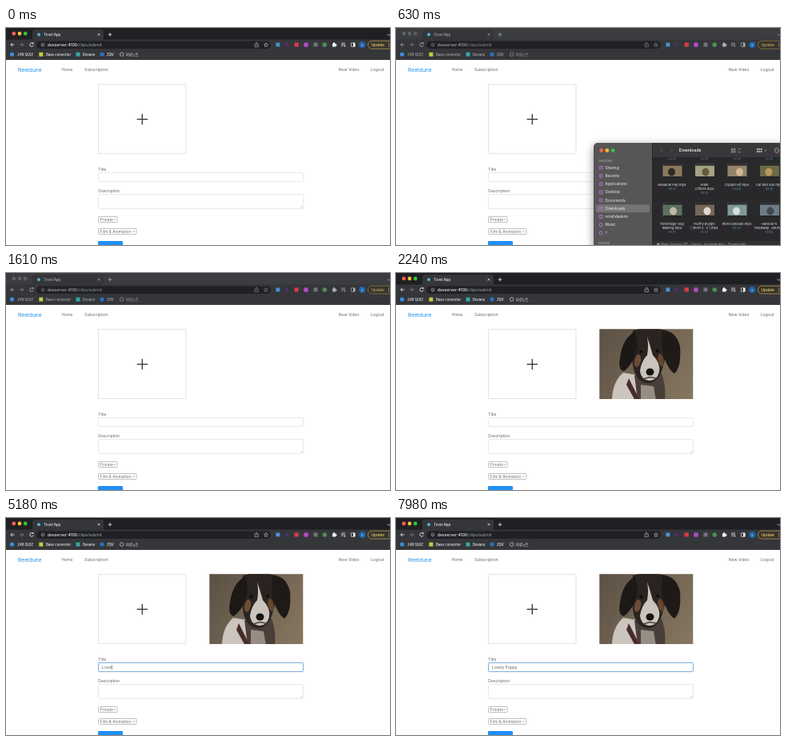
Recreate the animation shown at these times as an HTML page with a canvas. Size 480 by 272 pixels, loop 8000 ms.

```html
<!DOCTYPE html>
<html lang="en">
<head>
<meta charset="utf-8">
<title>Upload form</title>
<style>
html, body { margin: 0; width: 100%; height: 100%; overflow: hidden; background: #fff; }
canvas { display: block; width: 480px; height: 272px; }
</style>
</head>
<body>
<canvas id="stage"></canvas>
<script>
const W = 480, H = 272, LOOP = 8000;
const SANS = 'Inter, "Noto Sans CJK KR", "Noto Sans CJK", sans-serif';
const canvas = document.getElementById('stage');
const g = canvas.getContext('2d');
const ratio = window.devicePixelRatio || 1;
canvas.width = W * ratio;
canvas.height = H * ratio;

const DIALOG_IN = 420, PICK = 1400, DIALOG_OUT = 1610, ACTIVE = 1680, PREVIEW = 2240;
const FOCUS = 3500, CARET = 3340;
const TITLE = 'Lovely Puppy';
const KEYS = [4130, 4480, 4620, 4830, 4970, 5320, 5530, 5740, 6090, 6370, 6860, 7000];

const clamp = v => Math.max(0, Math.min(1, v));

function rect(x, y, w, h, fill) {
  g.fillStyle = fill;
  g.fillRect(x, y, w, h);
}

function box(x, y, w, h, r, fill, stroke, lw = 1) {
  g.beginPath();
  g.roundRect(x, y, w, h, r);
  if (fill) { g.fillStyle = fill; g.fill(); }
  if (stroke) { g.strokeStyle = stroke; g.lineWidth = lw; g.stroke(); }
}

function oval(x, y, rx, ry, fill, turn = 0) {
  g.beginPath();
  g.ellipse(x, y, rx, ry, turn, 0, 7);
  g.fillStyle = fill;
  g.fill();
}

const dot = (x, y, r, fill) => oval(x, y, r, r, fill);

function ring(x, y, r, color, lw = 0.7) {
  g.beginPath();
  g.arc(x, y, r, 0, 7);
  g.strokeStyle = color;
  g.lineWidth = lw;
  g.stroke();
}

function line(color, lw, ...p) {
  g.beginPath();
  for (let i = 0; i < p.length; i += 2) g.lineTo(p[i], p[i + 1]);
  g.strokeStyle = color;
  g.lineWidth = lw;
  g.stroke();
}

function shape(path, fill) {
  g.fillStyle = fill;
  g.fill(new Path2D(path));
}

function text(s, x, y, size, color, weight = 400, align = 'left') {
  g.font = `${weight} ${size}px ${SANS}`;
  g.textAlign = align;
  g.fillStyle = color;
  g.fillText(s, x, y);
  return g.measureText(s).width;
}

function lights(x, y, on) {
  ['#ff5f57', '#febc2e', '#28c840'].forEach((c, i) => dot(x + i * 7.2, y, 2.4, on ? c : '#5d6064'));
}

function browser(on) {
  const ink = on ? '#eef0f2' : '#a9acb0', soft = on ? '#c3c6ca' : '#8d9196';
  rect(0, 0, W, 15, on ? '#1f2023' : '#3b3d41');
  rect(0, 14.5, W, 25.5, '#35363a');
  box(33, 2, 89, 16, 3, '#35363a');
  lights(9.8, 7, on);
  dot(41, 8.2, 2, '#4fb5d0');
  text('Tovel App', 47.3, 10, 4.4, ink, 500);
  line(ink, 0.7, 114.6, 6.8, 117.4, 9.6);
  line(ink, 0.7, 117.4, 6.8, 114.6, 9.6);
  line(ink, 0.8, 127.7, 8.2, 132.3, 8.2);
  line(ink, 0.8, 130, 5.9, 130, 10.5);
  line(ink, 0.7, 476.5, 7.5, 478.5, 9.3, 480.5, 7.5);

  // toolbar
  line(ink, 0.8, 8, 18.8, 5.8, 21, 8, 23.2);
  line(ink, 0.8, 5.8, 21, 10.5, 21);
  line('#85888c', 0.8, 19.5, 18.8, 21.7, 21, 19.5, 23.2);
  line('#85888c', 0.8, 17, 21, 21.7, 21);
  g.beginPath();
  g.arc(32, 21, 2.2, 0.3, 5.6);
  g.strokeStyle = ink;
  g.lineWidth = 0.8;
  g.stroke();
  shape('M32.2 18.3h2.3v2.4z', ink);
  box(38, 16.4, 293, 9.6, 4.8, '#202124');
  ring(46, 21, 1.9, soft, 0.6);
  line(soft, 0.6, 46, 20.6, 46, 22.2);
  const host = text('devserver:4100', 51.8, 22.9, 5, ink, 500);
  text('/clips/submit', 51.8 + host, 22.9, 5, on ? '#a4a9af' : '#8d9196');
  line(soft, 0.6, 312.2, 20, 311, 20, 311, 23.6, 315.4, 23.6, 315.4, 20, 314.2, 20);
  line(soft, 0.6, 313.2, 22, 313.2, 18.2);
  line(soft, 0.6, 312, 19.2, 313.2, 18, 314.4, 19.2);
  g.beginPath();
  for (let i = 0; i <= 10; i++) {
    const a = i * Math.PI / 5 - Math.PI / 2, r = i % 2 ? 1.2 : 2.8;
    g.lineTo(325 + r * Math.cos(a), 21.2 + r * Math.sin(a));
  }
  g.strokeStyle = soft;
  g.lineWidth = 0.6;
  g.stroke();

  rect(337.5, 18.5, 4.8, 4.8, '#4b93d6');
  rect(349, 18.8, 3.6, 4.6, '#4d2f68');
  box(360.5, 18.2, 5.4, 5.4, 1, '#d83b42');
  dot(375, 21, 2.9, '#b34ac8');
  rect(384.5, 18.4, 5, 5, '#70757a');
  dot(398.3, 21, 2.8, '#4f9150');
  box(408, 19.3, 4.3, 4.3, 0.5, ink);
  dot(410, 19, 1.1, ink);
  dot(412.5, 21.4, 1.1, ink);
  for (let i = 0; i < 3; i++) line(ink, 0.7, 419, 19 + i * 1.7, i < 2 ? 424 : 421.5, 19 + i * 1.7);
  dot(423.5, 22.6, 0.9, ink);
  box(431.4, 18.8, 4.8, 4.5, 0.4, null, ink, 0.7);
  rect(434, 18.8, 2.2, 4.5, ink);
  dot(445.3, 21, 4, '#1d67ad');
  text('S', 445.3, 22.5, 4, '#dce7f2', 400, 'center');
  box(452.5, 16.2, 34, 9.8, 4.9, '#35332f', on ? '#d0a548' : '#a1853f', 0.7);
  text('Update', 456.5, 22.7, 4.8, on ? '#f8d067' : '#c8aa5c', 500);
  for (let i = -1; i < 2; i++) dot(478.5, 21 + i * 1.9, 0.55, '#d9bb68');

  // bookmarks
  dot(7.6, 33, 2.6, '#3a8ee0');
  rect(41.3, 30.6, 5, 5, '#c6cc3f');
  rect(87.5, 30.6, 5, 5, '#35a9a4');
  dot(120, 33, 2.6, '#2871c4');
  ring(144.7, 33, 2.3, soft, 0.8);
  [['248 QUIZ', 14.3], ['Base converter', 50], ['Dovano', 95.7], ['ZQV', 126], ['마루노트', 150]]
    .forEach(([s, x]) => text(s, x, 34.6, 4.3, ink, 500));
}

function select(label, y, w) {
  box(115.5, y + 0.5, w, 7, 1, '#fff', '#a4a4a4', 0.7);
  text(label, 117.6, y + 5.8, 4.95, '#6c6c6c');
  const x = 115.5 + w - 3.4;
  line('#6c6c6c', 0.6, x - 1.4, y + 3.4, x, y + 4.8, x + 1.4, y + 3.4);
}

function page(t) {
  const ink = '#646464', edge = '#e6e6e6';
  rect(0, 40, W, H - 40, '#fff');
  text('Reeldune', 15, 54.8, 6.75, '#2492e8');
  [['Home', 69.5], ['Subscription', 98], ['New Video', 415.8], ['Logout', 456]]
    .forEach(([s, x]) => text(s, x, 53.6, 5, ink));
  box(115.5, 70.5, 109.5, 87, 0, '#fff', '#e0e0e0', 0.9);
  line('#333', 1.3, 163.6, 114.4, 177, 114.4);
  line('#333', 1.3, 170.3, 107.7, 170.3, 121.1);
  text('Title', 115.3, 179, 5, ink);
  text('Description', 115.3, 206, 5, ink);

  const f = clamp((t - FOCUS) / 300);
  box(115.5, 181.4, 256, 11.2, 1.3, '#fff', edge, 0.9);
  if (f) box(115.5, 181.4, 256, 11.2, 1.3, null, `rgba(112,166,224,${f})`, 0.9);
  const typed = KEYS.filter(k => k <= t).length;
  const end = 119.8 + text(TITLE.slice(0, typed), 119.8, 188.9, 5, '#646464');
  const since = t - (typed ? KEYS[typed - 1] : CARET);
  if (t >= FOCUS && Math.floor(since / 500) % 2 === 0) rect(end + 0.1, 184.2, 0.5, 5.8, '#555');

  box(115.5, 208.5, 256, 18, 1.3, '#fff', edge, 0.9);
  line('#999', 0.5, 368, 225.3, 370.3, 223);
  line('#999', 0.5, 369.5, 225.3, 370.3, 224.5);
  select('Private', 236, 23.7);
  select('Film & Animation', 251, 47.5);
  box(115, 267, 31, 12, 1.2, '#1f8ff5');
}

function preview() {
  g.save();
  g.beginPath();
  g.rect(254.3, 70.3, 117, 87.7);
  g.clip();
  const bg = g.createLinearGradient(254, 75, 371, 150);
  bg.addColorStop(0, '#5c5145');
  bg.addColorStop(0.5, '#726452');
  bg.addColorStop(1, '#85765f');
  rect(254, 70, 118, 88, bg);
  g.filter = `blur(${0.7 * ratio}px)`;
  // body and collar
  shape('M270 158Q271 136 284 125L302 128 306 158z', '#cbc5bd');
  shape('M298 128L332 126Q338 142 336 160H302z', '#4a3f38');
  shape('M306 140L322 142 325 160H306z', '#968d84');
  shape('M291 132L305 160H299L288 140z', '#4a2a2a');
  // head and ears
  shape('M296 72Q316 66 338 72Q343 90 334 116Q329 138 314 138Q301 136 297 120Q293 100 296 72z', '#2a2320');
  shape('M299 73Q283 82 280 106Q277 122 285 123Q299 112 302 90z', '#1c1816');
  shape('M333 72Q350 72 355 92Q357 118 348 126Q338 120 332 94z', '#1e1a18');
  // face
  oval(302, 110, 4, 8, '#6d4c36', 0.2);
  oval(331, 109, 3.5, 8, '#66462f', -0.2);
  shape('M314 80Q318 92 321 103Q331 113 329 124Q326 135 317 135Q306 134 305 122Q307 110 314 103Q316 92 314 80z', '#cbc4bc');
  dot(306.5, 98.5, 2, '#0f0c0b');
  dot(327, 97.5, 2, '#0f0c0b');
  oval(317.5, 124, 5, 4.5, '#161313');
  line('#4c403b', 1.4, 309, 133, 317, 130.5, 326, 132);
  g.restore();
}

// name lines, length, then the tones of the small picture
const FILES = [
  [['Meadow Pup.mp4'], '00:21', '#8a7a5c', '#2f2a22'],
  [['Plain', 'Critters.mp4'], '00:21', '#a4a384', '#65583f'],
  [['Copper Kit.mp4'], '01:09', '#93846a', '#d3b893'],
  [['Cat and Sun.mp4'], '00:16', '#6c6a45', '#b69a5c'],
  [['footbridge-dog', 'walking.mp4'], '00:17', '#5c7061', '#c3b99f'],
  [['FlUfFy pUppY', '[ short v...o ].mp4'], '00:41', '#746758', '#dfd9d0'],
  [['RiverCascade.mp4'], '00:37', '#7f9a95', '#d6dedb'],
  [["Harbour's", 'Roadway...ew.mp4'], '00:52', '#6f7c86', '#3f4850']
];

function file([names, len, back, front], i, picked) {
  const x = 345.5 + (i % 4) * 40.5, y = i < 4 ? 170.5 : 219.5;
  if (picked) {
    box(x - 14, y - 2, 28, 22, 2, '#4a4a4c');
    box(x - 18, y + 22, 36, 11, 1.5, '#2460c4');
  }
  rect(x - 12, y, 24, 17.5, back);
  rect(x - 12, y, 24, 2, '#252424');
  rect(x - 12, y + 15.5, 24, 2, '#252424');
  oval(x + (i % 3) * 2 - 1, y + 10, 4.5, 5, front);
  names.forEach((s, n) => text(s, x - 0.5, y + 27.4 + n * 5.3, 4.1, '#e3e3e3', 400, 'center'));
  text(len, x - 0.5, y + 27.2 + names.length * 5.3, 3.6, '#4c9ed0', 400, 'center');
}

function dialog(picked) {
  g.save();
  g.shadowColor = 'rgba(0,0,0,.45)';
  g.shadowBlur = 12 * ratio;
  g.shadowOffsetY = 3 * ratio;
  box(247, 144, 250, 150, 5, '#565557');
  g.restore();
  g.save();
  g.beginPath();
  g.roundRect(247, 144, 250, 150, 5);
  g.clip();
  rect(320.5, 144, 160, 128, '#29292b');
  rect(320.5, 144, 160, 18.5, '#38383a');
  rect(320.2, 144, 0.7, 128, '#1d1d1e');
  lights(256.7, 153.5, true);

  text('Favorites', 253, 168, 3.9, '#a3a2a4', 500);
  const pink = '#c17bd4';
  ['Sharing', 'Recents', 'Applications', 'Desktop', 'Documents', 'Downloads', 'sorahdaekim', 'Music', '?']
    .forEach((s, i) => {
      const y = 175 + i * 10.25;
      if (i === 5) box(250, y - 5, 67, 10, 2, '#747375');
      if (i % 3 === 0) box(254, y - 2, 4.4, 4, 0.5, null, pink, 0.8);
      else ring(256.2, y, 2.1, pink, 0.8);
      if (i < 7) line(pink, 0.7, 256.2, y - 1.2, 256.2, y + 1);
      text(s, 261.5, y + 1.7, 4.7, '#f0f0f0');
    });
  text('Remote', 253, 271.4, 3.9, '#a3a2a4', 500);

  line('#58585a', 0.9, 333, 151, 330.8, 153.5, 333, 156);
  line('#58585a', 0.9, 343.5, 151, 345.7, 153.5, 343.5, 156);
  text('Downloads', 353.7, 155.4, 5.15, '#f0f0f0', 600);
  const ic = '#b9b9bb';
  for (let i = 0; i < 4; i++) box(419.2 + (i % 2) * 3, 151.2 + (i >> 1) * 3, 1.9, 1.9, 0.2, null, ic, 0.6);
  line(ic, 0.7, 427.7, 152.4, 429.2, 150.9, 430.7, 152.4);
  line(ic, 0.7, 427.7, 154.8, 429.2, 156.3, 430.7, 154.8);
  for (let i = 0; i < 6; i++) rect(451 + (i % 3) * 2.4, 151 + Math.floor(i / 3) * 3, 1.8, 2, ic);
  line(ic, 0.7, 460.4, 152.8, 461.8, 154.2, 463.2, 152.8);
  ring(476, 153.5, 2.8, ic, 0.7);
  for (let i = -1; i < 2; i++) dot(476 + i * 1.4, 153.5, 0.45, ic);

  for (let i = 0; i < 4; i++) text('00:19', 345 + i * 40.5, 164.5, 3.6, '#4c9ed0', 400, 'center');
  rect(320.5, 162, 160, 0.6, '#1d1d1e');
  FILES.forEach((f, i) => file(f, i, picked && i === 5));
  rect(320.5, 267, 160, 5, '#313133');
  rect(326, 269.6, 3.4, 3, '#8b8b8e');
  text('Main Volume HD › Users › sorahdaekim › Downloads', 331, 273.2, 4.3, '#a6a6a8');
  g.restore();
}

function draw(t) {
  g.setTransform(ratio, 0, 0, ratio, 0, 0);
  page(t);
  browser(t < 490 || t >= ACTIVE);
  if (t >= PREVIEW) preview();
  if (t >= 490 && t < DIALOG_OUT) {
    g.globalAlpha = clamp((t - DIALOG_IN) / 210);
    dialog(t >= PICK);
    g.globalAlpha = 1;
  }
}

const start = performance.now();
function tick() {
  draw((performance.now() - start) % LOOP);
  requestAnimationFrame(tick);
}
tick();
</script>
</body>
</html>
```
